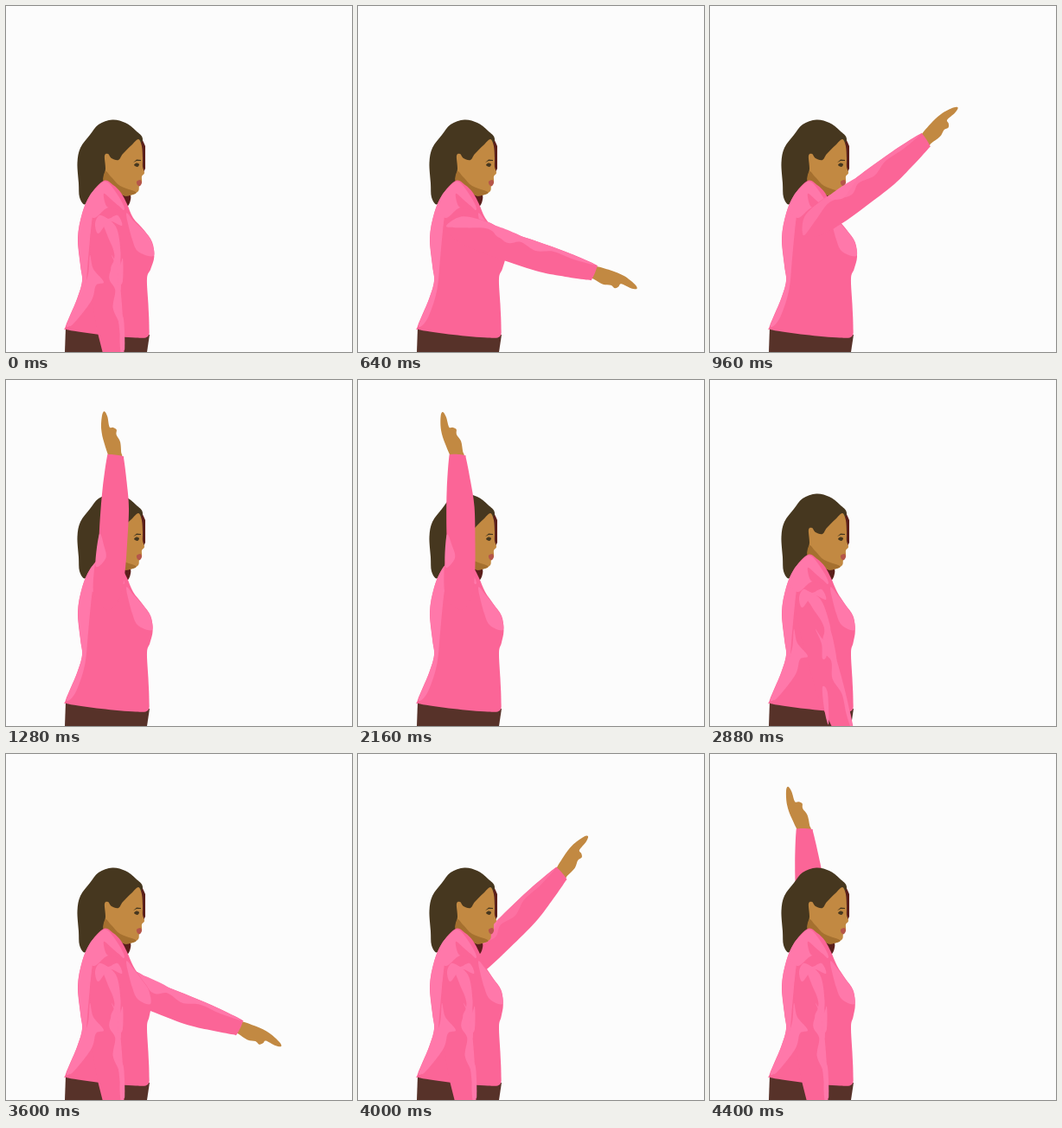
Write an HTML page with a canvas that moves like this. It is 400 px wide and 400 px high and loops after 8 s.

```html
<!DOCTYPE html>
<html lang="en">
<head>
<meta charset="utf-8">
<title>Arm raises</title>
<style>
  html, body { margin: 0; width: 100%; height: 100%; overflow: hidden; background: #fcfcfc; }
  canvas { display: block; width: 100vw; height: 100vh; object-fit: contain; }
</style>
</head>
<body>
<canvas id="stage" width="400" height="400"></canvas>
<script>
const ctx = document.getElementById('stage').getContext('2d');
const LOOP = 8000, STEP = 80, LAST_MOVE = 4400;
const SHOULDER = [115, 254], FOREARM_END = 168;
const C = {
  bg: '#fcfcfc', pink: '#fb6597', light: '#ff78aa', hair: '#46371f', maroon: '#5a1f1b',
  skin: '#c28942', shade: '#a5702f', lips: '#b5564a', pants: '#573229'
};

// Arm elevation in degrees over time (0 = forward, 90 = straight up).
const NEAR = [[0, -86], [320, -63], [640, -19], [880, 22], [1280, 86], [1600, 97],
  [1760, 96], [2160, 90], [2400, 40], [2640, -23.5], [2880, -75], [3040, -86]];
const FAR = [[3120, -86], [3600, -22], [4000, 44], [4400, 92]];

const clamp = (v, lo = 0, hi = 1) => Math.min(hi, Math.max(lo, v));

// Monotone cubic interpolation through [time, value] keys.
function sample(keys, t) {
  const n = keys.length - 1;
  if (t <= keys[0][0]) return keys[0][1];
  if (t >= keys[n][0]) return keys[n][1];
  const slope = i => (keys[i + 1][1] - keys[i][1]) / (keys[i + 1][0] - keys[i][0]);
  const tangent = i => {
    if (i === 0) return slope(0);
    if (i === n) return slope(n - 1);
    const a = slope(i - 1), b = slope(i);
    return a * b <= 0 ? 0 : 2 * a * b / (a + b);
  };
  let i = 0;
  while (t > keys[i + 1][0]) i++;
  const h = keys[i + 1][0] - keys[i][0], u = (t - keys[i][0]) / h;
  const v = 1 - u;
  return v * v * (1 + 2 * u) * keys[i][1] + u * u * (3 - 2 * u) * keys[i + 1][1]
    + h * u * v * (v * tangent(i) - u * tangent(i + 1));
}

// Closed smooth outline through a flat list of x, y pairs.
function blob(color, xy) {
  const n = xy.length / 2;
  const p = i => { const k = ((i + n) % n) * 2; return [xy[k], xy[k + 1]]; };
  ctx.fillStyle = color;
  ctx.beginPath();
  ctx.moveTo(...p(0));
  for (let i = 0; i < n; i++) {
    const a = p(i - 1), b = p(i), c = p(i + 1), d = p(i + 2);
    ctx.bezierCurveTo(b[0] + (c[0] - a[0]) / 6, b[1] + (c[1] - a[1]) / 6,
      c[0] - (d[0] - b[0]) / 6, c[1] - (d[1] - b[1]) / 6, c[0], c[1]);
  }
  ctx.fill();
}

function poly(color, xy) {
  ctx.fillStyle = color;
  ctx.beginPath();
  for (let i = 0; i < xy.length; i += 2) ctx.lineTo(xy[i], xy[i + 1]);
  ctx.fill();
}

function faded(alpha, draw) {
  ctx.save();
  ctx.globalAlpha = alpha;
  draw();
  ctx.restore();
}

function arm(angle) {
  const rad = Math.PI / 180;
  ctx.save();
  ctx.translate(...SHOULDER);
  ctx.rotate(-angle * rad);

  ctx.save();
  ctx.translate(FOREARM_END, 0);
  ctx.rotate(-clamp((angle + 19) * 0.19, -4, 21) * rad);
  blob(C.skin, [-4, -6.5, 16, -8.9, 33, -7.8, 48, -2.6, 51.8, 1.4, 45, 3, 33, 2,
    31, 6, 27.5, 9, 22, 7.2, 13, 9.2, 1, 7, -4, 6]);
  ctx.restore();

  blob(C.pink, [-12, 4, 2, -13, 32, -15.5, 54, -12.5, 93, -12.8, 128, -12.3, 164, -9.8,
    168, -7, 167, 8, 163, 10, 137, 15.1, 107, 19.6, 65, 20.5, 30, 20, 2, 16]);
  blob(C.light, [38, -14, 75, -12.4, 62, -6, 48, -3]);
  faded(clamp((70 - angle) / 40), () =>
    blob(C.light, [-12, 5, 2, -12, 32, -15.3, 54, -12.4, 93, -12.6, 128, -12, 165, -9,
      140, -7, 115, -8, 95, -2, 75, -6, 60, 0, 35, -8, 10, -1]));
  ctx.restore();
}

function head() {
  poly(C.maroon, [150, 150, 157, 153, 161, 162, 161, 188, 157, 196, 148, 190]);
  blob(C.maroon, [133, 217, 144, 219, 141, 231, 134, 225]);
  blob(C.hair, [123, 131.5, 138, 135, 150, 144, 158, 154, 150, 170, 148, 195, 128, 206,
    112, 204, 98, 219, 91, 229.5, 85, 221, 84, 205, 82.5, 181, 86, 164, 97, 149, 107, 137]);
  blob(C.skin, [114, 173, 118, 171, 122, 176, 130, 178, 135, 171, 145, 161, 153, 154,
    157, 162, 158, 176, 158, 186, 160, 193, 157, 197, 157, 204, 154, 208, 153, 214,
    146, 218, 136, 219, 125, 210, 113, 203, 115, 188]);
  blob(C.shade, [115, 191, 122, 198, 132, 208, 150, 215, 145, 218.5, 136, 219, 125, 210, 113, 203]);
  blob(C.lips, [151, 203, 155, 201, 157, 204, 155, 208, 152, 207]);
  poly(C.hair, [147, 181, 151, 177.5, 156, 178, 156, 179, 151, 179]);
  blob(C.hair, [148, 184, 151, 181.5, 154, 183, 152, 186]);
}

function torso(t, angle) {
  const bust = 3.5 * clamp(1 - t / 2640);
  poly(C.pants, [69, 372, 166, 380, 163, 400, 68, 400]);
  blob(C.pink, [113, 202, 97, 219, 88, 240, 83, 268, 86, 300, 88, 318, 82, 339, 69, 370,
    72, 374.5, 110, 380, 150, 383.5, 164, 382, 165.5, 370, 164.5, 345, 163, 315,
    165.5 + bust / 2, 304, 167.8 + bust, 290, 165.5 + bust, 273, 156 + bust, 259,
    147, 245, 140, 229, 133, 216, 124, 207]);
  blob(C.light, [106, 210, 97, 219, 88, 240, 83.3, 268, 86.2, 300, 88, 318, 82, 339,
    70, 370, 80, 362, 91, 330, 95, 292, 98, 260, 102, 228]);
  blob(C.light, [113, 203, 124, 211, 137, 235, 118, 233, 102, 245, 92, 236, 98, 219]);
  blob(C.pink, [113, 217, 122, 224, 136, 237, 124, 234, 116, 231]);
  blob(C.light, [139, 240, 148, 249, 157 + bust, 261, 165 + bust, 273, 167 + bust, 289,
    153, 284, 146, 270]);
  return () => faded(clamp((-40 - angle) / 30), () => {
    blob(C.light, [97, 288, 101, 304, 113, 319, 104, 323, 98, 342, 74, 370, 88, 330, 95, 310]);
    blob(C.light, [108, 242, 118, 246, 129, 242, 134, 254, 119, 249, 107, 263, 103, 252]);
    blob(C.light, [122, 288, 131, 300, 135, 292, 135, 318, 130, 322, 129, 305]);
    blob(C.light, [130, 355, 136, 362, 137, 398, 132, 380]);
  });
}

function draw(t) {
  const near = sample(NEAR, t);
  ctx.fillStyle = C.bg;
  ctx.fillRect(0, 0, 400, 400);
  arm(sample(FAR, t));
  head();
  const folds = torso(t, near);
  arm(near);
  folds();
}

function frame(now) {
  const t = Math.floor((now % LOOP) / STEP) * STEP;
  draw(Math.min(t, LAST_MOVE));
  requestAnimationFrame(frame);
}
draw(0);
requestAnimationFrame(frame);
</script>
</body>
</html>
```
